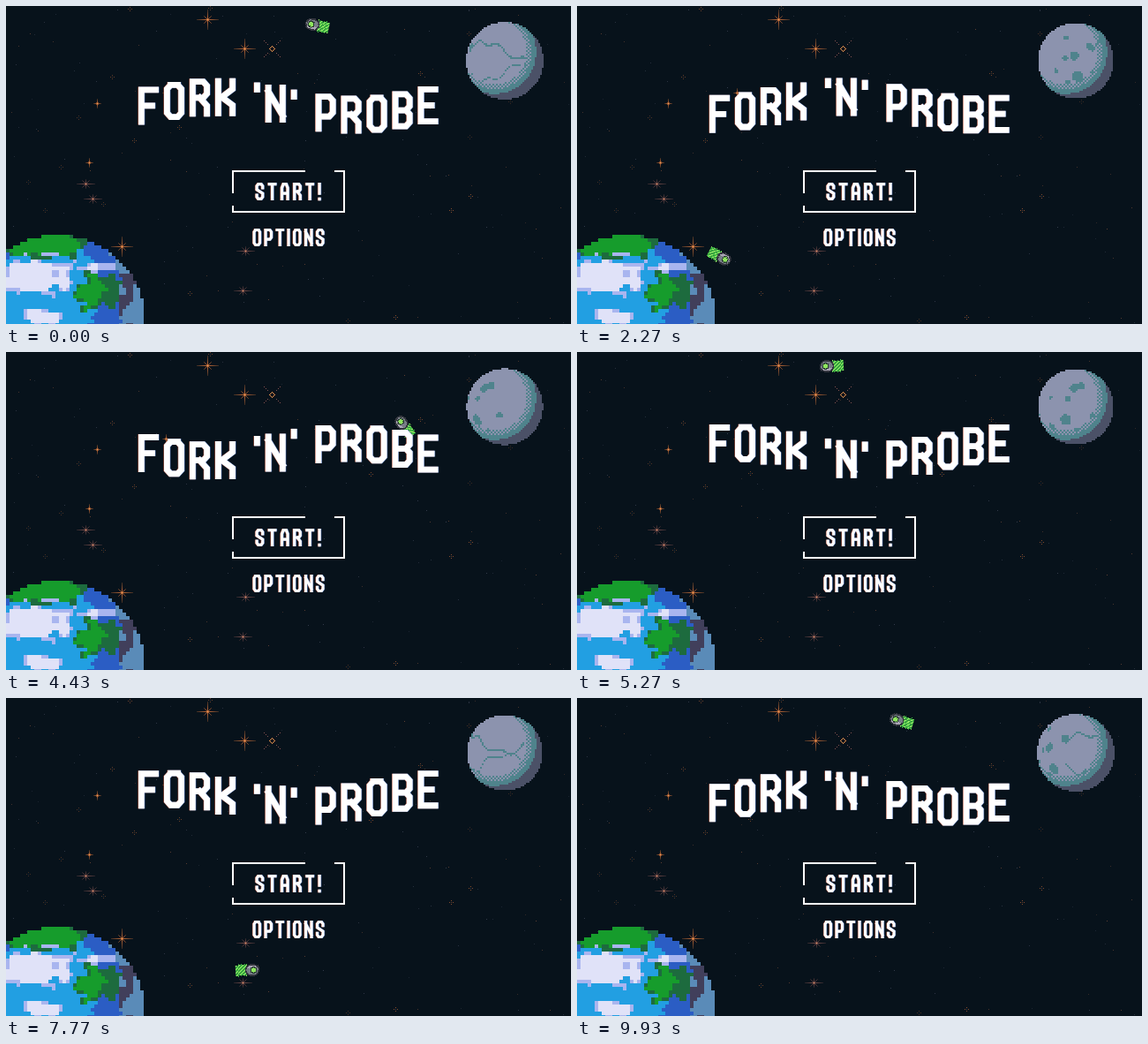
Recreate the animation shown at these times as an HTML page with a canvas. Size 640 by 360 pixels, loop 9.96 s.

```html
<!DOCTYPE html>
<html lang="en">
<head>
<meta charset="utf-8">
<title>Fork 'n' Probe</title>
<style>
html, body { margin: 0; width: 100%; height: 100%; overflow: hidden; background: #07121b; }
canvas { display: block; width: 640px; height: 360px; image-rendering: pixelated; }
</style>
</head>
<body>
<canvas id="stage" width="640" height="360" role="img" aria-label="FORK 'N' PROBE. START! OPTIONS">FORK 'N' PROBE / START! / OPTIONS</canvas>
<script>
const LOOP = 9960, TAU = Math.PI * 2;
const ctx = document.getElementById('stage').getContext('2d');

function layer(w, h, paint) {
  const c = document.createElement('canvas');
  c.width = w;
  c.height = h;
  paint(c.getContext('2d'));
  return c;
}

function hash(x, y) {
  const v = Math.sin(x * 127.1 + y * 311.7) * 43758.5453;
  return v - Math.floor(v);
}

// smooth noise between lattice points
function noise(x, y) {
  const i = Math.floor(x), j = Math.floor(y), u = x - i, v = y - j;
  const mix = (a, b, k) => a + (b - a) * k * k * (3 - 2 * k);
  return mix(mix(hash(i, j), hash(i + 1, j), u), mix(hash(i, j + 1), hash(i + 1, j + 1), u), v);
}

function box(g, color, x, y, w = 1, h = 1) {
  g.fillStyle = color;
  g.fillRect(x, y, w, h);
}

// ---- Stars ----
const ORANGE = '#c9703a', DIM = '#80524f';
const bright = [[228, 15], [270, 48], [131, 272]];
const wide = [[98, 218], [90, 201], [271, 277], [268, 322]];
const small = [[94, 177], [103, 110], [181, 98]];

function spark(g, [x, y], across, down, color) {
  const arm = (r, dx, dy) => {
    for (let i = 1; i <= r; i++) {
      g.globalAlpha = 1 - 0.7 * i / r;
      for (const s of [-i, i]) box(g, color, x + s * dx, y + s * dy);
    }
  };
  arm(across, 1, 0);
  arm(down, 0, 1);
  arm(across * 0.4, 1, 1);
  arm(across * 0.4, 1, -1);
  g.globalAlpha = 1;
  box(g, '#f0a466', x, y);
}

const sky = layer(640, 360, g => {
  box(g, '#07121b', 0, 0, 640, 360);
  for (let i = 0; i < 170; i++) {
    const x = Math.floor(hash(i, 1) * 640), y = Math.floor(hash(i, 2) * 360);
    g.globalAlpha = 0.25 + 0.4 * hash(i, 7);
    box(g, i % 3 ? '#4b5164' : '#8d5940', x, y);
    if (i % 8) continue;
    for (const s of [-2, 2]) {
      box(g, ORANGE, x + s, y);
      box(g, ORANGE, x, y + s);
    }
  }
  g.globalAlpha = 1;
  for (const p of bright) spark(g, p, 12, 11, ORANGE);
  for (const p of wide) spark(g, p, 10, 5, DIM);
  for (const p of small) spark(g, p, 4, 5, ORANGE);
  // star with a diamond core and diagonal arms
  for (let i = -10; i <= 10; i++) {
    const h = 3 - Math.abs(i);
    for (const s of [-1, 1]) {
      if (h >= 0) box(g, '#e9964f', 301 + i, 48 + s * h);
      else if (i % 2) box(g, DIM, 301 + i, 48 + s * i);
    }
  }
});

// ---- Earth: three shades for each kind of ground ----
const ground = {
  sea: ['#229fe2', '#2b5dc4', '#5a8bb8'],
  land: ['#169c2c', '#1d6b3e', '#413f5b'],
  cloud: ['#e0e2f8', '#a9b5ef', '#5a8bb8']
};
// centre and radii of the large areas
const areas = [
  ['land', 28, 266, 58, 21], ['land', 103, 324, 26, 22],
  ['cloud', 26, 306, 48, 21], ['cloud', 42, 351, 22, 8], ['cloud', 108, 296, 15, 5]
];

function earthColor(x, y) {
  const rough = noise(x / 11, y / 8), fine = hash(x, y);
  let kind = 'sea', edge = 0;
  for (const [name, cx, cy, rx, ry] of areas) {
    const d = Math.hypot((x - cx) / rx, (y - cy) / ry) + (rough - 0.5) * 0.9;
    if (d < 1) [kind, edge] = [name, d];
  }
  const far = Math.hypot(x - 45, y - 325) + (rough - 0.5) * 14 + fine * 3;
  if (far > 87) return noise(x / 14 + 5, y / 14) > 0.55 ? ground.land[2] : ground.sea[2];
  const shade = far > 66 || (kind !== 'sea' && edge > 0.84) ? 1 : 0;
  return ground[kind][shade];
}

const earth = layer(40, 26, g => {
  for (let j = 0; j < 26; j++) {
    for (let i = 0; i < 40; i++) {
      const x = i * 4 + 2, y = j * 4 + 261;
      if (Math.hypot(x - 58, y - 359) < 100) box(g, earthColor(x, y), i, j);
    }
  }
});

function drawEarth(t) {
  const drop = Math.cos(TAU * t / 2.5) < 0 ? 1 : 0;
  ctx.drawImage(earth, 0, 259 + drop, 160 - drop, 104);
}

// ---- Moon ----
const SPIN = 8.67;
const craters = Array.from({ length: 16 }, (_, i) => ({
  lon: (i % 2 ? -1.7 : -4) + (hash(i, 3) - 0.5) * 1.3,
  lat: (hash(i, 4) - 0.5) * 1.5,
  size: 0.06 + 0.1 * hash(i, 5)
}));

function marked(lon, lat) {
  const turn = a => a - TAU * Math.round(a / TAU);
  if (craters.some(c => Math.hypot(turn(lon - c.lon) * Math.cos(lat), lat - c.lat) < c.size)) return true;
  const a = turn(lon);
  if (Math.abs(a) > 1.2) return false;
  const ridge = 0.25 * Math.sin(2.4 * a) + 0.07 * Math.sin(9 * a);
  return Math.abs(lat - ridge + 0.25) < 0.03 || Math.abs(lat + ridge - 0.3) < 0.02;
}

function drawMoon(t) {
  const R = 43.5 + 0.6 * Math.cos(TAU * (t - 0.5) / 3), rot = TAU * t / SPIN;
  for (let y = -43; y <= 43; y += 2) {
    for (let x = -43; x <= 43; x += 2) {
      const d = Math.hypot(x, y);
      if (d > R) continue;
      const far = Math.hypot(x + 12, y + 10);
      const dither = ((x + y) / 2) & 1 ? 2.5 : -2.5;
      let color = '#8c93ae';
      if (far > 47.5) color = '#4b5167';
      else if (far + dither > 39.5
        || marked(Math.atan2(x, Math.sqrt(R * R - d * d)) - rot, Math.asin(y / R))) color = '#4f838c';
      box(ctx, color, 564 + x, 61 + y, 2, 2);
    }
  }
}

// ---- Rocket on a tilted ellipse ----
const LAP = 5;

function place(t) {
  const c = Math.cos(TAU * t / LAP), s = Math.sin(TAU * t / LAP);
  return [281 + 71 * c - 178 * s, 162 - 140 * c - 42 * s];
}

function rocketColor(x, y) {
  const hull = Math.hypot((x - 18.5) / 8.5, y / 7), port = Math.hypot(x - 20, y);
  if (port < 2.6) return '#8ee65e';
  if (port < 4) return '#283a32';
  if (hull < 0.78) return y < -2 ? '#a9a5b4' : '#777d86';
  if (hull < 1) return '#34363f';
  const fringe = 7 - 2.5 * hash(x, 9);
  if (x > 13 || Math.abs(y) > fringe) return null;
  return ['#2f8d3a', '#45c247', '#9fe66a', '#45c247'][Math.floor(x + y + 8) % 4];
}

const rocket = layer(28, 16, g => {
  for (let y = 0; y < 16; y++) {
    for (let x = 0; x < 28; x++) {
      const color = rocketColor(x, y - 7.5);
      if (color) box(g, color, x, y);
    }
  }
});

function drawRocket(t) {
  const [x, y] = place(t), [nx, ny] = place(t + 0.02);
  ctx.save();
  ctx.translate(Math.round(x), Math.round(y));
  ctx.rotate(Math.atan2(ny - y, nx - x));
  ctx.drawImage(rocket, -14, -8);
  ctx.restore();
}

// ---- Lettering: strokes on a grid 4 wide and 8 high ----
const glyphs = {
  A: '08 02 10 30 42 48|05 45',
  B: '08 00 30 41 43 34 04|34 45 47 38 08',
  E: '40 00 08 48|04 34',
  F: '40 00 08|04 34',
  I: '00 08',
  K: '00 08|40 42 14 46 48',
  N: '08 00|01 47|40 48',
  O: '10 30 41 47 38 18 07 01 10 30',
  P: '08 00 30 41 44 35 05',
  R: '08 00 30 41 43 34 04|24 46 48',
  S: '42 41 30 10 01 03 45 47 38 18 07 06',
  T: '00 40|20 28',
  '!': '00 05|08 08.1',
  "'": '00 01'
};
const narrow = "I!'";

function makeGlyph(ch, w, h, pen) {
  const p = new Path2D(), ux = (w - pen) / 4, uy = (h - pen) / 8;
  for (const line of glyphs[ch].split('|')) {
    line.split(' ').forEach((pt, i) => {
      p[i ? 'lineTo' : 'moveTo'](pen / 2 + pt[0] * ux, pen / 2 + pt.slice(1) * uy);
    });
  }
  return p;
}

function makeLine(text, x, y, { w, h, pen, gap, space }) {
  const line = [];
  for (const ch of text) {
    if (ch === ' ') { x += space; continue; }
    line.push({ x, y, pen, path: makeGlyph(ch, w, h, pen) });
    x += (narrow.includes(ch) ? pen : w) + gap;
  }
  return line;
}

function drawGlyph({ x, y, pen, path }, dy = 0) {
  ctx.lineWidth = pen;
  for (const [dx, color] of [[-0.6, '#a85540'], [0.6, '#4567a5'], [0, '#fff']]) {
    ctx.save();
    ctx.translate(x + dx, y + dy);
    ctx.strokeStyle = color;
    ctx.stroke(path);
    ctx.restore();
  }
}

const title = makeLine("FORK 'N' PROBE", 150, 91.5, { w: 23, h: 43, pen: 6.8, gap: 6, space: 15 });
const menu = [
  ...makeLine('START!', 282.5, 200, { w: 9.8, h: 20, pen: 3.2, gap: 4.4 }),
  ...makeLine('OPTIONS', 279.5, 252, { w: 9.6, h: 20, pen: 3.1, gap: 3.4 })
];
const frameLine = new Path2D('M339 187H257V212M257 226V233H383V187H372');

function drawText(t) {
  ctx.lineCap = 'square';
  for (const g of title) drawGlyph(g, 10 * Math.sin(5 * t + g.x / 50 + 0.14));
  for (const g of menu) drawGlyph(g);
  ctx.lineCap = 'butt';
  ctx.lineWidth = 2;
  ctx.strokeStyle = '#fff';
  ctx.stroke(frameLine);
}

const start = performance.now();

function frame() {
  const t = ((performance.now() - start) % LOOP) / 1000;
  ctx.imageSmoothingEnabled = false;
  ctx.drawImage(sky, 0, 0);
  drawMoon(t);
  drawEarth(t);
  drawRocket(t);
  drawText(t);
  requestAnimationFrame(frame);
}
frame();
</script>
</body>
</html>
```
